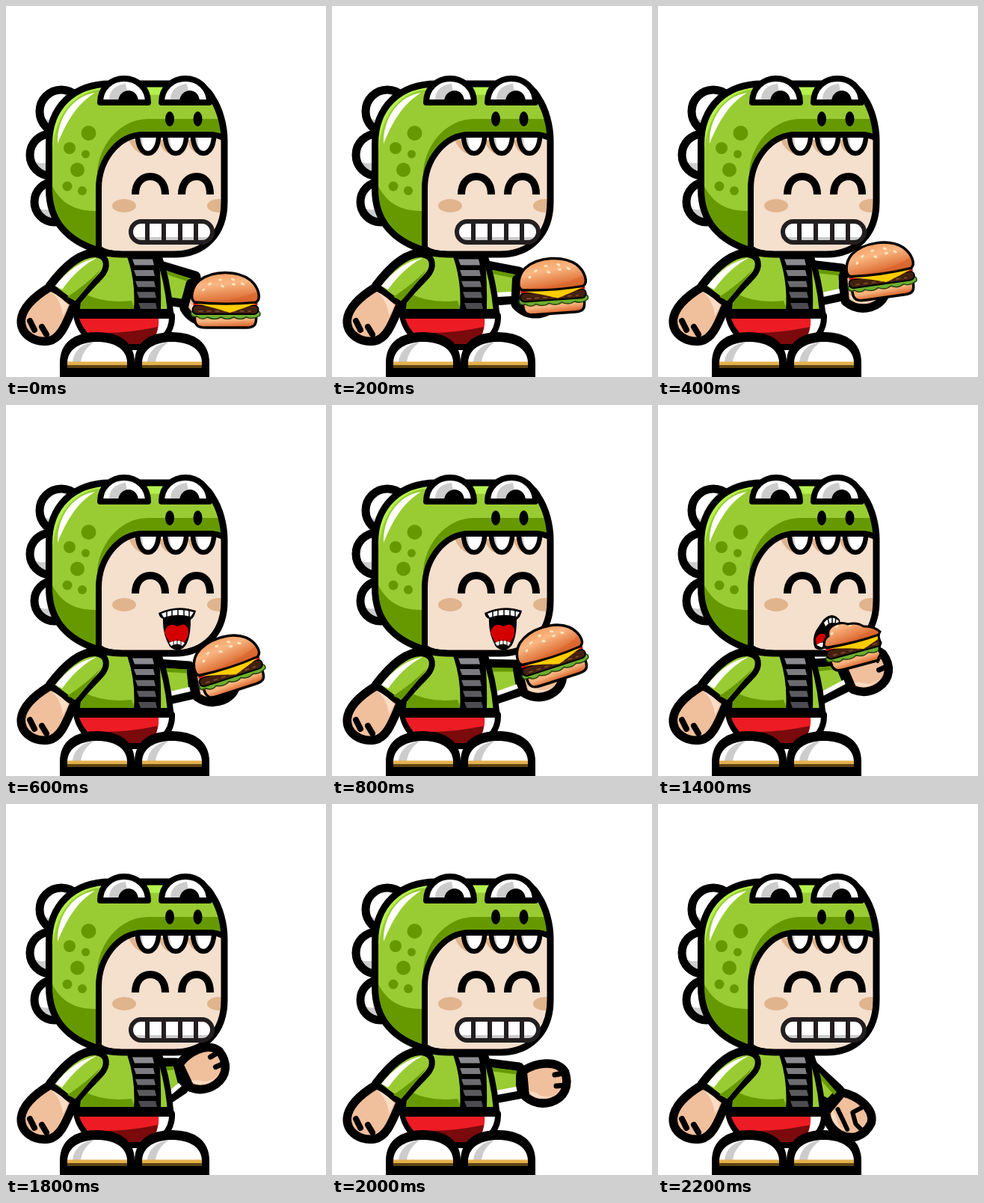
Recreate the animation shown at these times as an HTML page. Size 428 by 496 pixels, loop 2400 ms.

```html
<!DOCTYPE html>
<html lang="en">
<head>
<meta charset="utf-8">
<title>Burger bite</title>
<style>
html, body { margin: 0; width: 100%; height: 100%; overflow: hidden; background: #fff; }
svg { display: block; width: 428px; height: 496px; }
.ink, .rim { stroke: #000; stroke-width: 8; stroke-linejoin: round; stroke-linecap: round; }
.rim { stroke-width: 15; }
.line { fill: none; }
.green { fill: #9c3; }
.dark { fill: #690; }
.lime { fill: #b4f04e; }
.skin { fill: #f0bf9c; }
.tan { fill: #e0b48c; }
.white { fill: #fff; }
.grey { fill: #ccc; }
.red { fill: #ed1c24; }
</style>
</head>
<body>
<svg viewBox="0 0 428 496">
  <defs>
    <linearGradient id="bun" x1="0" y1="0" x2="0.25" y2="1">
      <stop offset="0" stop-color="#f39a5a"/><stop offset=".45" stop-color="#f9b682"/><stop offset="1" stop-color="#dc6a30"/>
    </linearGradient>
    <path id="headShape" d="M124 327C85 315 57.500 290 57.500 245V185C57.500 135 90 104 140 104H240C262 104 270 112 276 123C286 138 292 160 292 180V262C292 305 265 332 225 332H155C140 332 128 329 124 327Z"/>
    <path id="faceShape" d="M124 324V244C124 206 150 172 184 172H270Q284 172 292 177V262C292 305 265 332 225 332H155Q135 332 124 324Z"/>
    <path id="nearHand" d="M60 377C45 386 24 401 22 420C21 438 39 449 57 446C73 443 80 420 90 398Z"/>
    <path id="nearSleeve" d="M60 375C78 351 100 331 120 332C137 334 137 350 127 361C115 374 101 387 93 400Z"/>
    <path id="farHand" d="M-28-15C-13-25 15-30 25-14C31 4 24 19 7 24C-8 28-19 22-25 17Z"/>
    <path id="bite" d="M222 326Q221 313 228 309Q226 300 234 295Q244 289 254 293Q266 290 275 296Q288 295 297 303Q293 309 298 318Q294 328 298 333Q293 339 294 345"/>
    <clipPath id="headClip"><use href="#headShape"/></clipPath>
    <clipPath id="faceClip"><use href="#faceShape"/></clipPath>
    <clipPath id="biteClip"><use href="#bite"/><path d="M220 325L298 333L294 358H220Z"/></clipPath>
    <clipPath id="firstBite"><path d="M222 326Q221 313 228 308Q226 298 236 293Q248 286 258 282Q270 268 290 268L320 290V358H220Z"/></clipPath>
    <g id="tooth">
      <path class="white" d="M-14 0C-13 13-7 21 0 21S13 13 14 0Z"/>
      <path class="grey" d="M-14 0C-13 12-8 20-3 21Q-8 10-8 0Z"/>
      <path class="ink line" style="stroke-width:6.5" d="M-14 0C-13 13-7 21 0 21S13 13 14 0"/>
    </g>
    <g id="topEye">
      <path class="white ink" d="M-32 129C-32 109-17 97 0 97S32 109 32 129Z"/>
      <path class="grey" d="M-20 125C-20 112-10 105 2 104L6 125Z"/>
      <path d="M-8 128C-8 118 0 113 6 113S19 118 19 128Z"/>
    </g>
    <g id="shoe">
      <path class="ink" style="stroke-width:10" d="M-45 496V477C-45 453-28 441 0 441S45 453 45 477V496Z"/>
      <path class="white" d="M-40 476C-39 458-22 449 0 449S39 458 40 476Z"/>
      <path class="grey" d="M-33 476C-31 461-20 451-4 449Q-20 460-22 476Z"/>
      <rect x="-40" y="475.500" width="80" height="5" fill="#e3b04b"/>
      <rect x="-40" y="480.500" width="80" height="3.500" fill="#5c4313"/>
    </g>
    <g id="burgerArt">
      <path fill="url(#bun)" stroke="#000" stroke-width="3.500" d="M-41 20C-42 34-36 36-26 36H28C38 36 42 33 41 20Z"/>
      <path fill="#6cae2f" stroke="#26420d" stroke-width="1.500" d="M-46 15Q-47 23-38 21Q-31 27-24 22Q-14 27-6 22Q3 27 11 22Q20 27 28 22Q37 26 46 20Q48 15 42 13Z"/>
      <rect x="-44" y="6" width="88" height="12" rx="6" fill="#43200f" stroke="#000" stroke-width="2"/>
      <path d="M-36 14H34" stroke="#7a4427" stroke-width="2" stroke-dasharray="6 5"/>
      <path fill="#c61b10" d="M-43 1H43V6H-43Z"/>
      <path fill="#fc0" d="M-38 4H40L24 10L6 16L-14 10Z"/>
      <path fill="url(#bun)" stroke="#000" stroke-width="3.500" d="M-41 2C-48-2-45-18-35-27C-17-41 17-41 34-27C45-17 48-2 41 2Q0 6-41 2Z"/>
      <path fill="#d9652d" opacity=".6" d="M-40 0Q8 3 42-12Q44-1 39 1Q0 5-40 0Z"/>
      <path stroke="#ffe6bd" stroke-width="3" stroke-linecap="round" d="M-22-22l2-1M-8-28l2 0M-5-20l2 1M9-29l2 1M10-22l2 0M22-23l2 1M-30-14l1-1"/>
    </g>
  </defs>

  <!-- far sleeve -->
  <path id="sleeveRim" class="rim"/>
  <path id="sleeve" class="green ink"/>
  <path id="sleeveShade" class="line" stroke="#690" stroke-width="5"/>
  <path id="cuffShine" class="line" stroke="#fff" stroke-width="6"/>

  <!-- trousers and shoes -->
  <path class="white ink" d="M94 414H222C223 437 205 456 178 456H150C120 456 99 440 94 414Z"/>
  <path class="red" d="M98 418H204Q206 438 190 452H150C122 452 105 438 98 418Z"/>
  <path fill="#7a0a0c" d="M110 436Q150 440 203 429Q202 444 190 452H150Q123 450 110 436Z"/>
  <use href="#shoe" x="122"/>
  <use href="#shoe" x="222"/>

  <!-- jacket -->
  <path class="green ink" d="M110 330H203Q216 365 220 409H95Q98 355 110 330Z"/>
  <path class="dark" d="M99 405Q101 392 106 385Q130 398 168 394L172 405Z"/>
  <path d="M160 330H204Q208 370 207 408H171Q174 365 160 330Z"/>
  <g id="stripes"></g>
  <path class="ink" style="stroke-width:11" d="M96 411H219"/>

  <!-- near arm -->
  <use href="#nearHand" class="rim"/>
  <path class="rim line" d="M60 375C78 351 100 331 120 332"/>
  <use href="#nearHand" class="skin ink"/>
  <path fill="#fbdcc4" d="M60 382Q74 388 83 400Q80 408 76 414Q74 394 60 382Z"/>
  <path class="ink line" d="M32 421L38 433M48 429L54 439"/>
  <use href="#nearSleeve" class="green ink"/>
  <path class="dark" d="M82 389Q108 372 127 352Q118 365 93 394Z"/>
  <path class="white" d="M66 374Q92 342 121 337Q96 350 75 379Z"/>

  <!-- head -->
  <g id="spikes"></g>
  <use href="#headShape" class="green"/>
  <g clip-path="url(#headClip)">
    <path class="lime" d="M62 190C68 145 88 119 122 112Q200 126 280 111L266 100H90L55 140Z"/>
    <path class="dark" d="M56 225C66 260 88 275 122 274V226C122 190 150 151 190 151H300V180H184C150 180 128 202 128 240V335H56Z"/>
    <path class="white" d="M69 184C68 151 88 121 119 116C94 132 82 153 69 184Z"/>
  </g>
  <g id="spots" class="dark"></g>
  <use href="#faceShape" fill="#f5dfcd"/>
  <g clip-path="url(#faceClip)" class="tan">
    <path d="M164 179H181L184 199Q170 194 164 179ZM204 179H220L222 199Q208 195 204 179ZM242 179H257L260 199Q246 195 242 179Z"/>
    <ellipse cx="158" cy="267" rx="16" ry="9"/>
    <ellipse cx="284" cy="267" rx="15" ry="9"/>
  </g>
  <use href="#faceShape" class="ink line"/>
  <use href="#headShape" class="ink line" style="stroke-width:9"/>
  <use href="#tooth" x="190" y="176"/>
  <use href="#tooth" x="227" y="176"/>
  <use href="#tooth" x="264" y="176"/>
  <use href="#topEye" x="158"/>
  <use href="#topEye" x="240"/>
  <ellipse cx="219" cy="151" rx="6" ry="10"/>
  <ellipse cx="256.500" cy="151" rx="6" ry="10"/>
  <path class="ink line" style="stroke-linecap:butt;stroke-width:10" d="M173 252C173 236 182 228 193 228S213 236 213 252M235 252C235 236 244 228 255 228S273 236 273 252"/>

  <!-- mouths -->
  <g id="grin">
    <rect x="167" y="288" width="109" height="28" rx="14" fill="#fff"/>
    <path class="grey" d="M172 309H271Q267 313 262 313H181Q176 313 172 309Z"/>
    <g fill="none" stroke="#231f20" stroke-width="6">
      <rect x="167" y="288" width="109" height="28" rx="14"/>
      <path d="M189 288V316M211 288V316M233 288V316M254 288V316"/>
    </g>
  </g>
  <g id="open">
    <path d="M204 278Q229 266 254 275Q252 284 247 287Q247 311 240 322Q230 333 219 323Q209 306 210 286Q205 284 204 278Z"/>
    <path class="white" d="M208 279Q229 270 251 277L247 283Q229 278 211 284Z"/>
    <path stroke="#000" stroke-width="1.500" d="M215 274V285M222 273V285M230 273V285M238 273V285M245 274V285"/>
    <path fill="#d40000" d="M212 304Q216 289 229 296Q241 289 244 301Q245 311 236 320H222Q215 314 212 304Z"/>
    <path class="white" d="M218 318Q229 312 239 318L236 322Q229 317 221 322Z"/>
    <path stroke="#000" d="M224 314V322M229 313V322M234 314V322"/>
  </g>
  <g id="chomp">
    <path d="M221 287Q233 275 243 287Q246 295 238 300Q226 307 227 322Q218 331 210 325Q205 315 211 302Z"/>
    <path class="white" d="M222 291Q232 279 242 289L240 293Q231 288 224 296Z"/>
    <path stroke="#000" stroke-width="1.500" d="M227 284L229 294M233 282V293M238 284L237 293"/>
    <path fill="#d40000" d="M211 313Q214 304 223 306L226 316Q217 316 212 321Z"/>
    <path class="white" d="M212 321Q218 315 224 319L219 324Z"/>
  </g>

  <!-- far hand and food -->
  <g id="hand">
    <use href="#farHand" class="rim"/>
    <use href="#farHand" class="skin ink"/>
    <path fill="#fbdcc4" d="M-22 10Q-12 12-6 17Q6 21 16 14Q6 22-8 20Q-18 19-22 10Z"/>
    <path id="fingers" class="ink line" style="stroke-width:7" d="M13-11L24-13M15 4L27 3"/>
    <path id="fist" class="ink line" style="stroke-width:6" d="M-18 4L-1 10L10 14M3-20L-1-7L13 1H24"/>
  </g>
  <g id="foodClip"><use id="burger" href="#burgerArt"/></g>
  <use id="biteEdge" href="#bite" fill="none" stroke="#000" stroke-width="3"/>
</svg>
<script>
const $ = id => document.getElementById(id);
const STEP = 200;

$('spikes').innerHTML = [[74, 141, 29], [60, 199, 28], [65, 262, 27]].map(([x, y, r]) =>
  `<circle cx="${x}" cy="${y}" r="${r}" class="grey"/>
   <circle cx="${x - 12}" cy="${y - 9}" r="${r * .72}" class="white"/>
   <circle cx="${x}" cy="${y}" r="${r}" class="ink line" style="stroke-width:11"/>`).join('');

$('spots').innerHTML = [[110.5, 170, 10], [85, 190, 8], [106.5, 198, 5.5], [95.5, 219, 9.5], [82, 241, 6.5], [102, 247, 6]]
  .map(([x, y, r]) => `<circle cx="${x}" cy="${y}" r="${r}"/>`).join('');

$('stripes').innerHTML = [0, 1, 2, 3, 4].map(i => {
  const x = 169 + i * 2, y = 338.5 + i * 14.6, c = 140 - i * 16;
  return `<path fill="rgb(${c},${c},${c + 4})" d="M${x} ${y}H${196 + i}L${198 + i} ${y + 8}H${x + 3}Z"/>`;
}).join('');

// cuff: top and bottom corners; hand and burger: x, y, angle
const pose = (cuff, hand) => ({ cuff, hand });
const low = pose([253, 362, 237, 396], [269, 396, 20]);
const mid = pose([250, 356, 243, 391], [274, 385, 8]);
const level = pose([246, 352, 246, 387], [277, 377, 0]);
const lifted = pose([245, 350, 249, 386], [280, 370, -5]);
const raised = pose([245, 348, 251, 382], [280, 363, -10]);
const near = pose([240, 345, 253, 376], [280, 355, -18]);
const empty = pose([227, 347, 236, 381], [265, 353, -20]);
const reach = pose([250, 353, 250, 387], [285, 373, 0]);
const rest = pose([242, 383, 228, 398], [256, 418, 45]);

const atMouth = [265, 312, -15];
const steps = [
  [low, 'grin', [293.5, 394, 0]],
  [mid, 'grin', [295, 375, -4]],
  [level, 'grin', [297.5, 354, -8]],
  [lifted, 'open', [297, 347, -18]],
  [raised, 'open', [293, 333, -18]],
  [near, 'open', atMouth],
  [near, 'chomp', atMouth, 'firstBite'],
  [near, 'chomp', atMouth, 'biteClip'],
  [empty, 'chomp'],
  [empty, 'grin'],
  [reach, 'grin'],
  [rest, 'grin']
];

const place = (el, [x, y, a]) => el.setAttribute('transform', `translate(${x} ${y}) rotate(${a})`);
const show = (el, on) => { el.style.display = on ? '' : 'none'; };
const trace = (id, d) => $(id).setAttribute('d', d);

function draw(i) {
  const [arm, mouth, food, clip] = steps[i];
  const [ax, ay, bx, by] = arm.cuff;
  const outline = `M203 347L${ax} ${ay}L${bx} ${by}L218 393Z`;
  trace('sleeveRim', outline);
  trace('sleeve', outline);
  trace('sleeveShade', `M208 354L${ax - 3} ${ay + 6}`);
  trace('cuffShine', `M220 386L${bx - 3} ${by - 6}`);
  show($('cuffShine'), arm !== low && arm !== rest);
  place($('hand'), arm.hand);
  show($('fist'), arm === rest);
  show($('fingers'), arm !== rest);
  for (const m of ['grin', 'open', 'chomp']) show($(m), m === mouth);
  show($('burger'), food);
  if (food) place($('burger'), food);
  $('foodClip').setAttribute('clip-path', clip ? `url(#${clip})` : 'none');
  show($('biteEdge'), clip === 'biteClip');
}

let last = -1;
function tick() {
  const i = Math.floor(performance.now() / STEP) % steps.length;
  if (i !== last) draw(last = i);
  requestAnimationFrame(tick);
}
tick();
</script>
</body>
</html>
```
